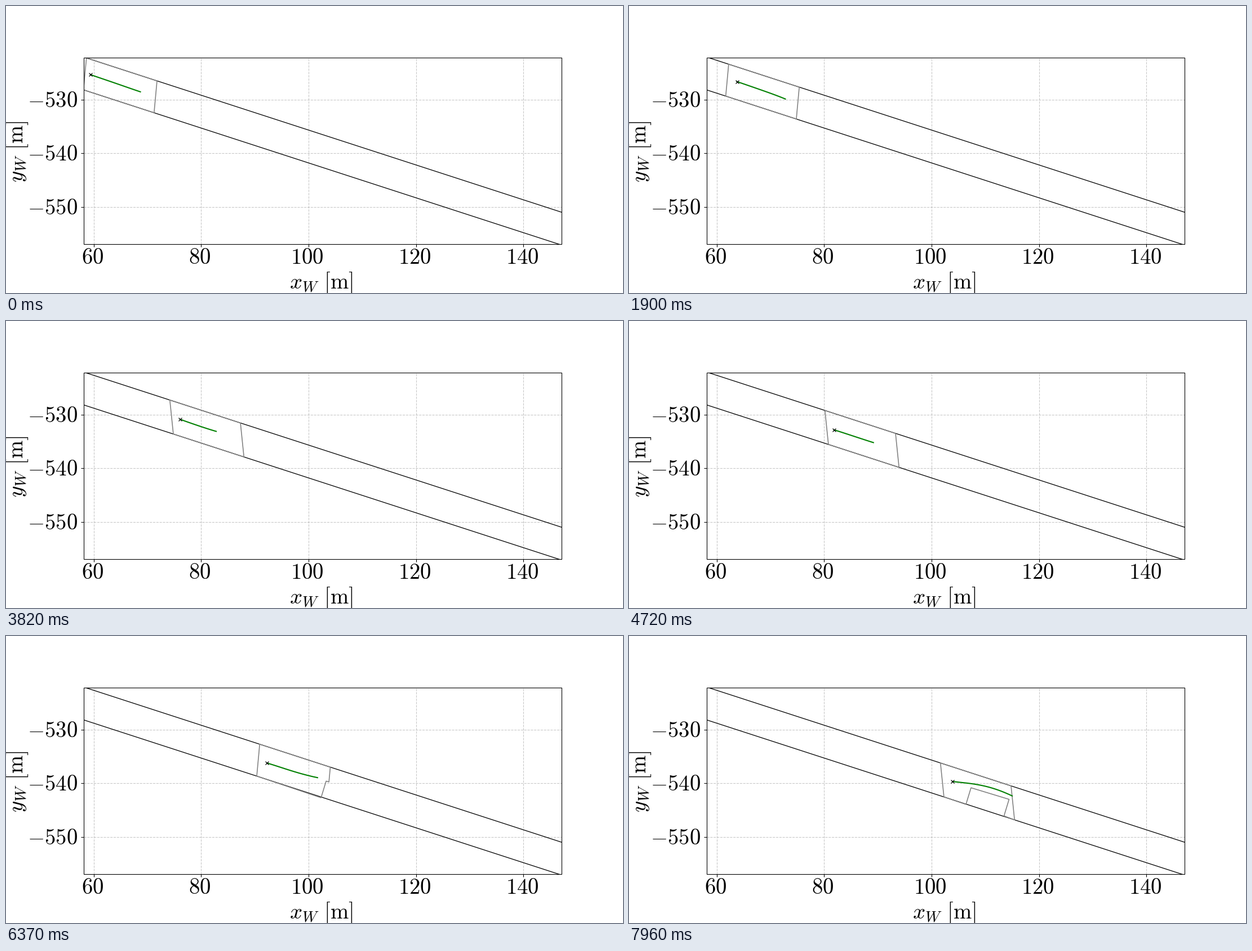
A matplotlib script that plays this animation: 1095x511 px, repeating every 7990 ms.

```python
import numpy as np
import matplotlib.pyplot as plt
from matplotlib.animation import FuncAnimation
from matplotlib.patches import Rectangle

W, H, DPI = 1095, 511, 100
PX = 72 / DPI                      # points per pixel
LOOP, INTERVAL = 7990, 17
START, STEP, LAST = 850, 30, 7960  # hold, then one move every STEP ms

LEFT, RIGHT, TOP, BOTTOM = 137.5, 985.5, 92.5, 424.5
XTICKS = {60: 155.5, 80: 345.9, 100: 536.6, 120: 727.5, 140: 918.4}
YTICKS = {-530: 166.9, -540: 262.3, -550: 357.6}

# Lane borders, sampled at equal spacing
SLOPE = 0.3257
SPACING = 11.39
UPPER_X, LOWER_X = 142.7, 137.5
AHEAD = 11
PROJECT = SLOPE / (1 + SLOPE ** 2)

# Vehicle: time -> x, and x -> y
CAR_T = [820, 1100, 1360, 1630, 1900, 2680, 3820, 5620, 6490, 7060, 7300, 7960]
CAR_X = [150, 154.5, 163.5, 176.2, 191.5, 239, 309, 418.5, 470.6, 507, 521.8, 574]
TRACK_X = [150, 191.5, 239, 309, 418.5, 507, 530, 555, 574]
TRACK_Y = [122.3, 134.6, 151.6, 175, 212.5, 239.6, 247, 255, 259]

# Planned path: time, length in x, drop at each quarter of the length
PLANS = np.array([
    [820, 88.5, 7.6, 15.2, 22.9, 30.5],
    [1900, 86, 7.4, 14.9, 22.6, 31],
    [2680, 84, 6.2, 13.5, 21.3, 29.2],
    [3820, 64, 5.8, 11.3, 16.6, 21.5],
    [5620, 76, 5.4, 11.4, 17.6, 24],
    [6300, 88, 6.8, 13.8, 20.5, 26.5],
    [7060, 104, 9.5, 18.3, 22.3, 20.7],
    [7960, 106, 3, 7.3, 14.7, 25.7],
])
QUARTERS = np.linspace(0, 1, 5)
FINE = np.linspace(0, 1, 40)


def upper(x):
    return TOP + SLOPE * (x - UPPER_X)


def lower(x):
    return 149.3 + SLOPE * (x - LOWER_X)


def car(t):
    x = np.interp(t, CAR_T, CAR_X)
    return x, np.interp(x, TRACK_X, TRACK_Y)


def plan(t):
    length, *drops = [np.interp(t, PLANS[:, 0], col) for col in PLANS.T[1:]]
    x, y = car(t)
    curve = np.polyfit(QUARTERS, [0, *drops], 4)
    return x + length * FINE, y + np.polyval(curve, FINE)


def obstacle(t):
    """Corners from lower right, over the top, to lower left."""
    s = (t - 7060) / 900
    tl = np.array([585 + 22 * s, 263.5 + 6.7 * s])
    along, down = np.array([67.5, 20.6]), np.array([-9, 29.6])
    return [tl + along + down, tl + along, tl, tl + down]


def free_space(t):
    """Lane section around the vehicle with the obstacle cut out."""
    x, y = car(t)
    up = x + (y - upper(x)) * PROJECT - UPPER_X
    low = x - (lower(x) - y) * PROJECT - LOWER_X
    i = max(0, np.floor(up / SPACING - 1.62))
    j = max(0, np.floor(low / SPACING))

    def on_upper(k):
        u = UPPER_X + SPACING * k
        return np.array([u, upper(u)])

    def on_lower(k):
        u = LOWER_X + SPACING * k
        return np.array([u, lower(u)])

    tl, tr = on_upper(i), on_upper(i + AHEAD)
    bl, br = on_lower(j), on_lower(j + AHEAD)
    edge = br - tr

    def beyond(p):
        return (p[0] - tr[0]) * edge[1] - (p[1] - tr[1]) * edge[0]

    chain = obstacle(t)
    side = [beyond(p) for p in chain]
    outside = [n for n, s in enumerate(side) if s > 0]
    if not outside:
        notch = [br, *chain]
    elif outside[-1] == 3:
        notch = [br]
    else:
        n = outside[-1]
        f = side[n] / (side[n] - side[n + 1])
        hit = chain[n] + f * (chain[n + 1] - chain[n])
        notch = [hit, *chain[n + 1:]]
    return np.array([tl, tr, *notch, bl, tl]).T


plt.rcParams["mathtext.fontset"] = "cm"
fig = plt.figure(figsize=(W / DPI, H / DPI), dpi=DPI, facecolor="white")
ax = fig.add_axes([0, 0, 1, 1])
ax.set_xlim(0, W)
ax.set_ylim(H, 0)
ax.axis("off")

xs, ys = list(XTICKS.values()), list(YTICKS.values())
grid = dict(colors="#b0b0b0", alpha=0.7, linestyles="--", lw=1.1 * PX, zorder=1)
ax.vlines(xs, BOTTOM, TOP, **grid)
ax.hlines(ys, LEFT, RIGHT, **grid)
ax.vlines(xs, BOTTOM, BOTTOM + 4.9, colors="black", lw=1.1 * PX)
ax.hlines(ys, LEFT - 4.9, LEFT, colors="black", lw=1.1 * PX)
frame = ax.add_patch(Rectangle((LEFT, TOP), RIGHT - LEFT, BOTTOM - TOP,
                               fill=False, ec="black", lw=1.1 * PX, zorder=5))


def line(x=(), y=(), **style):
    art, = ax.plot(x, y, **style)
    art.set_clip_path(frame)
    return art


def label(x, y, s, **kw):
    ax.text(x, y, f"${s}$", fontsize=28, va="baseline", **kw)


for value, x in XTICKS.items():
    label(x - 2, 459, value, ha="center")
for value, y in YTICKS.items():
    label(126.5, y + 13, value, ha="right")
label(560, 503, r"x_W\ [\mathrm{m}]", ha="center")
label(29.5, 259.5, r"y_W\ [\mathrm{m}]", ha="center",
      rotation=90, rotation_mode="anchor")

ends = np.array([LEFT - 5, RIGHT + 5])
for border in (upper, lower):
    line(ends, border(ends), color="black", lw=1.3 * PX, zorder=2)
area = line(color="gray", lw=1.6 * PX, zorder=3)
path = line(color="green", lw=2.1 * PX, zorder=3.5)
cross = line(color="black", marker="x", ms=5.6 * PX, mew=1.2 * PX, zorder=4)


def draw(i):
    t = (i + 1) * INTERVAL
    t = min(START + STEP * ((t - START) // STEP), LAST) if t >= START else START - STEP
    x, y = car(t)
    area.set_data(*free_space(t))
    path.set_data(*plan(t))
    cross.set_data([x], [y])
    return area, path, cross


anim = FuncAnimation(fig, draw, frames=LOOP // INTERVAL, interval=INTERVAL,
                     repeat=True, repeat_delay=0)
plt.show()
```
